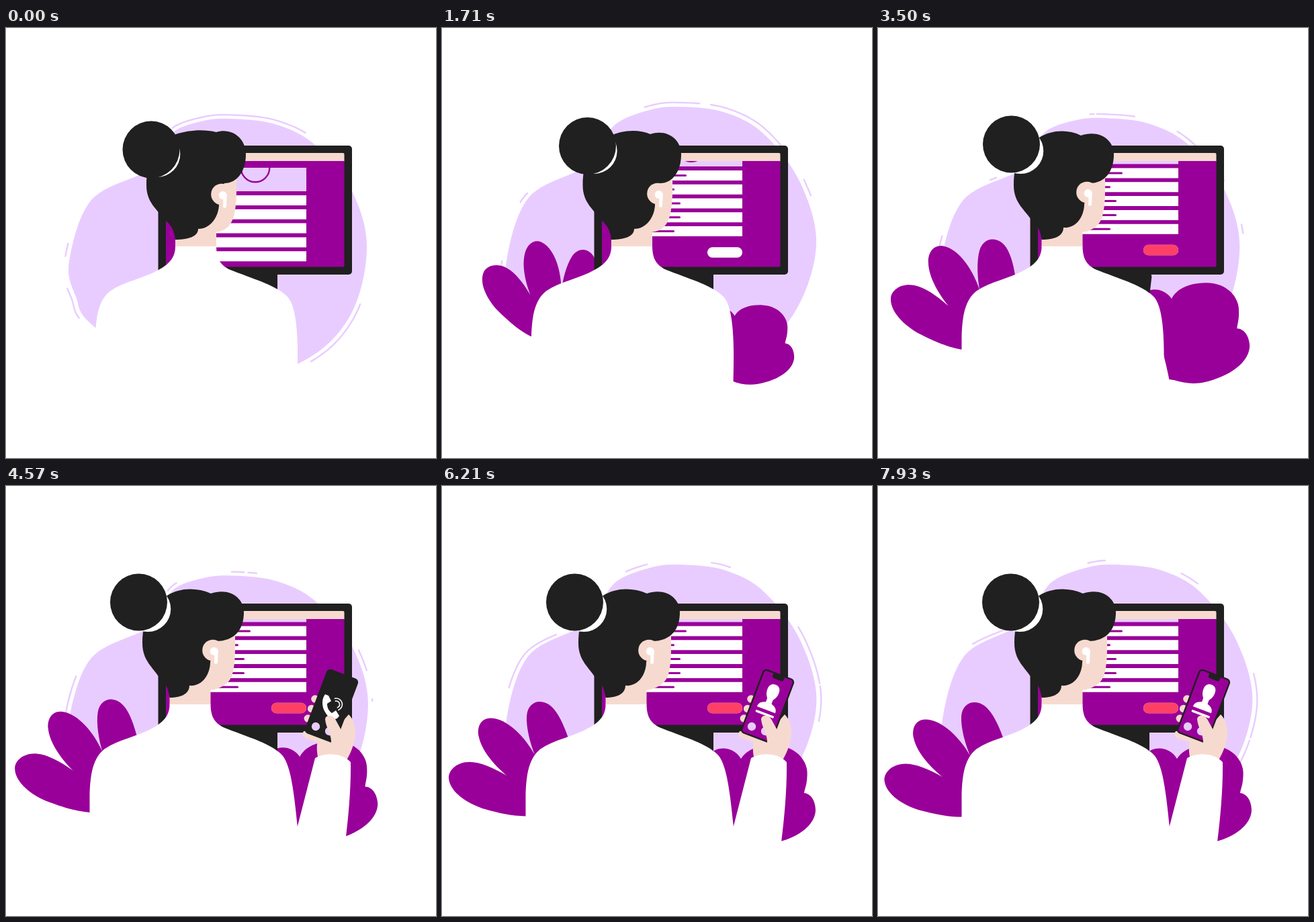
Recreate the animation shown at these times as an HTML page with a canvas. Size 640 by 640 pixels, loop 8000 ms.

```html
<!DOCTYPE html>
<html lang="en">
<head>
<meta charset="utf-8">
<title>Call from the desk</title>
<style>
html, body { margin: 0; width: 100%; height: 100%; overflow: hidden; background: #fff; }
canvas { display: block; }
</style>
</head>
<body>
<canvas id="stage" width="640" height="640"></canvas>
<script>
const ctx = document.getElementById('stage').getContext('2d');
const LOOP = 8000;
const WHITE = '#fff', LILAC = '#e9ccff', PURPLE = '#990099', BLACK = '#202020', SKIN = '#f7dacf', RED = '#ff4066';

// Key points of the blob, clockwise from its left side.
const blob = [[94, 347], [127, 256], [209, 213], [229, 185], [250, 154], [290, 139], [332, 135], [400, 143],
  [460, 174], [515, 243], [537, 330], [510, 432], [434, 500], [280, 545], [133, 446], [104, 400]];

// Dashes around the blob: middle (in key points along the outline) and length.
const fadingDashes = [[.2, .2], [-1.2, 1], [4.9, 1.8], [6.74, 1.9], [8.3, .3], [11.3, 1.1]];
const growingDashes = [[1.36, 1.06], [5, .6], [7.24, .4], [9.56, .9], [10.3, .5]];

const clamp = x => Math.max(0, Math.min(1, x));
const mix = (a, b, k) => a + (b - a) * k;
const span = (t, from, to) => clamp((t - from) / (to - from));
const ease = x => x < .5 ? 4 * x ** 3 : 1 - 4 * (1 - x) ** 3;
const smooth = x => x * x * (3 - 2 * x);

function fill(d, color) {
  ctx.fillStyle = color;
  ctx.fill(new Path2D(d));
}
function rect(x, y, w, h, color, r = 0) {
  ctx.fillStyle = color;
  ctx.beginPath();
  ctx.roundRect(x, y, w, h, r);
  ctx.fill();
}
function disc(x, y, r, color) {
  ctx.fillStyle = color;
  ctx.beginPath();
  ctx.arc(x, y, r, 0, 7);
  ctx.fill();
}
function stroke(color, width) {
  ctx.strokeStyle = color;
  ctx.lineWidth = width;
  ctx.lineCap = 'round';
  ctx.stroke();
}
function line(x1, y1, x2, y2, color, width) {
  ctx.beginPath();
  ctx.moveTo(x1, y1);
  ctx.lineTo(x2, y2);
  stroke(color, width);
}
function group(draw) {
  ctx.save();
  draw();
  ctx.restore();
}
function clip(x, y, w, h) {
  ctx.beginPath();
  ctx.rect(x, y, w, h);
  ctx.clip();
}
function turn(x, y, degrees, scale = 1) {
  ctx.translate(x, y);
  ctx.rotate(degrees * Math.PI / 180);
  ctx.scale(scale, scale);
  ctx.translate(-x, -y);
}

// Pushes the blob's upper right side outwards.
function swell([x, y], phase) {
  const right = span(x, 210, 300);
  return [
    x + phase * (2 + 18 * right * span(y, 500, 330)),
    y - phase * (8 + 10 * right) * span(y, 350, 150)
  ];
}

// Traces a smooth closed curve through the points, from a to b.
function trace(points, a, b, scale) {
  const n = points.length, steps = Math.ceil((b - a) * 12) + 1;
  ctx.beginPath();
  for (let s = 0; s <= steps; s++) {
    const u = mix(a, b, s / steps) + n, i = Math.floor(u), k = u - i;
    const near = [-1, 0, 1, 2].map(d => points[(i + d) % n]);
    ctx.lineTo(...[0, 1].map(axis => {
      const [p, q, r, z] = near.map(point => point[axis]);
      const v = q + k / 2 * (r - p + k * (2 * p - 5 * q + 4 * r - z + k * (3 * (q - r) + z - p)));
      return 325 + (v - 325) * scale;
    }));
  }
}

function drawBlob(t, phase) {
  const points = blob.map(point => swell(point, phase));
  trace(points, 0, blob.length, 1);
  ctx.fillStyle = LILAC;
  ctx.fill();

  const dash = (middle, length) => {
    if (length < .02) return;
    trace(points, middle - length / 2, middle + length / 2, 1.03);
    stroke(LILAC, 2.4);
  };
  const x = span(t, 0, 4800);
  for (const [middle, length] of fadingDashes) dash(middle + 1.6 * (1 - (1 - x) ** 1.5), length * (1 - x * x));
  for (const [middle, length] of growingDashes) dash(middle + (t - 7000) * .00044, length * span(t, 2600, 5400));
}

function drawPlants(t, phase) {
  group(() => {
    turn(192, 465, 57 * (1 - t / LOOP) ** 2.7, 1 - (1 - span(t, 0, 3600)) ** 3.5);
    fill(`M192 465L130 492.5C108 493 90 490 60 482C30 472 11 455 9.5 438C9 427 20 414 40 413.5
      C55 413 75 421 96 433C80 420 58 398 53 375C50 362 55 348 70 347.5C95 347 122 375 137 401
      C130 385 123 360 124 343C125 328 135 321 145 322C165 323 178 350 190 385Z`, PURPLE);
  });
  group(() => {
    turn(398, 518, -4.3 * (1 - phase), 1 - (1 - span(t, 0, 3100)) ** 2);
    fill(`M398 400C410 385 435 388 445 406C455 390 475 385 497 386C530 388 546 412 543.5 432
      C543 445 540 450 539 457C550 458 556 470 556 483C555 505 530 522 504 529
      C480 537 460 535 440 527L398 518Z`, PURPLE);
  });
}

function drawMonitor(t) {
  rect(226.5, 175, 288.5, 192, BLACK, 5);
  rect(320, 360, 84, 60, BLACK);
  rect(238, 186, 265.5, 12.5, SKIN, [2, 2, 0, 0]);
  rect(238, 198, 265.5, 157.5, PURPLE, [0, 0, 2, 2]);
  const scroll = 40.5 * ease(span(t, 500, 2170));
  group(() => {
    clip(238, 198, 265, 157.5);
    rect(295, 208 - scroll, 152, 35, LILAC);
    group(() => {
      clip(295, 208 - scroll, 152, 35);
      ctx.beginPath();
      ctx.arc(371, 208 - scroll * .82, 21.3, 0, 7);
      stroke(PURPLE, 2.4);
    });
    [364, 346, 355, 355, 346].forEach((end, i) => {
      const y = 249 + 20.8 * i - scroll;
      rect(295, y, 152, 15, WHITE);
      const typed = span(t, 150 + 260 * i, 450 + 260 * i);
      if (typed) line(300, y + 7.5, mix(300, end - 1.5, typed), y + 7.5, PURPLE, 3);
    });
    rect(395, 363.3 - scroll, 52, 15.5, WHITE, 7.5);
    ctx.globalAlpha = span(t, 2600, 2800);
    rect(395, 363.3 - scroll, 52, 15.5, RED, 7.5);
  });
}

function drawPhone(t) {
  const contact = span(t, 4900, 5050);
  group(() => {
    ctx.translate(484.5, 327.5);
    ctx.rotate(.361);
    rect(-25, -51, 50, 102, BLACK, 6);
    ctx.globalAlpha = contact;
    rect(-22.6, -48.6, 45.2, 97.2, PURPLE, 4);
    rect(-9, -50, 18, 8, BLACK, 3.5);
    fill(`M0 -34C7 -34 9.5 -29 9 -22C8.5 -16 6 -13 4.5 -11V-5C10 -3 14.5 -1 14.5 6H-14.5
      C-14.5 -1 -10 -3 -4.5 -5V-11C-6 -13 -8.5 -16 -9 -22C-9.5 -29 -7 -34 0 -34Z`, WHITE);
    line(-12.5, 12.6, 13, 12.6, WHITE, 3.4);
    ctx.globalAlpha = 1;
    disc(-11.2, 36.8, 6.2, LILAC);
    disc(10, 36.3, 6.2, LILAC);
  });
  group(() => {
    ctx.globalAlpha = 1 - contact;
    fill('M475 310L480 312L484 320L478 324C478 331 481 335 485 338L491 334L496 342C493 348 486 349 481 344C472 336 467 321 475 310Z', WHITE);
    for (const r of [5, 9]) {
      ctx.beginPath();
      ctx.arc(491.5, 325, r, -1.8, 1.2);
      stroke(WHITE, 1.6);
    }
  });
}

function drawArm(t, raised) {
  if (t < 3200) return;
  group(() => {
    ctx.translate(-73 * (1 - raised), 82 * (1 - raised));
    turn(480, 470, -14 * (1 - raised));
    for (let i = 0; i < 3; i++) disc(460 - 5.3 * i, 317 + 14.5 * i, 5.8, SKIN);
    fill('M443 365C437 375 447 376 465 381L470 362Z', SKIN);
    fill('M465 372C462 385 462 395 465 408L507 408C515 394 520 380 520 365C519 352 515 345 510 340L484 370Z', SKIN);
    drawPhone(t);
    const away = smooth(span(t, 4950, 5250)) - smooth(span(t, 5700, 6100));
    group(() => {
      ctx.translate(4 * away, 6 * away);
      turn(498, 385, -12 * away);
      fill('M475 347C476 340 486 340 490 347C494 354 497 360 500 365L512 362L505 387L484 383C485 370 476 360 475 347Z', SKIN);
    });
    fill('M460 405C475 396 501 397 513 411C513.5 450 510 490 505 530L495 680H395L434 506Z', WHITE);
  });
}

function drawWoman(t, raised) {
  const nod = smooth(span(t, 0, 1710)), lean = smooth(span(t, 1710, 3500)), look = smooth(span(t, 3500, 4500));
  const body = -8.5 * lean;
  const back = .5 * nod - 7.5 * lean + look;
  const top = -3 * nod - 10 * lean;
  const notchX = 313 - 3 * nod - 8 * lean + 3 * look;
  const notchY = 3 * nod + 2 * lean;
  const fringe = 357 - nod - 5 * lean + 3 * look;
  const cheek = 343 - 5 * lean + 3 * look;
  const ear = -10 * lean - 3 * look;
  const earY = 247.5 - nod - 2 * lean;
  const bunX = 216 + .5 * nod - 18 * lean - look;
  const bunY = 181 - 5.5 * nod - 2.5 * lean;
  const tie = 11.5 + nod + 4.5 * lean;

  group(() => {
    ctx.translate(body, 0);
    fill(`M252 324H313C313 345 320 355 338 361.5C375 376 401 383 418 399
      C432 412 ${436 + raised} 454 ${433.5 + 9 * raised} ${528 - 20 * raised}
      V640H133V460C134 428 138 405 155 391.5C176 377 205 373 227 360C242 352 252.5 342 252 324Z`, WHITE);
    fill('M252 285H313V325H252Z', SKIN);
  });
  fill(`M${290 + body} 215H${cheek}C${cheek} 240 ${cheek + 1} 262 ${cheek - 4} 280
    C${cheek - 8} 295 ${325 + body} 303 ${313 + body} 303.5H${285 + body}Z`, SKIN);
  fill(`M${253 + top} ${158 + notchY}C${270 + top} 152 ${295 + top} 150 ${notchX} ${155 + notchY}
    C${fringe - 22} ${148 + notchY * .6} ${fringe} ${163 + notchY * .6} ${fringe} 188
    C${fringe} 212 ${fringe - 12} 231 ${325 + ear} 231L${317 + ear} 262
    C${317 + ear} 280 ${305 + ear} 299 ${286 + ear} ${299 - 2 * lean}
    C${286 + ear} 310 ${272 + ear} 315 ${252 + body} 315
    C${250 + body} 300 ${246 + body} 294 ${238 + body} 287C${225 + back} 270 ${209 + back} 260 ${209 + back} 234
    C${209 + back} 195 ${225 + back} 170 ${253 + top} ${158 + notchY}Z`, BLACK);
  disc(321 + ear, earY, 15.8, SKIN);
  disc(322.7 + ear, earY + 1.5, 6, WHITE);
  line(326.2 + ear, earY + 1.5, 325.5 + ear, earY + 17.8, WHITE, 5);
  disc(bunX + tie * .81, bunY + tie * .59, 34, WHITE);
  disc(bunX, bunY, 42.5, BLACK);
}

function draw(now) {
  const t = now % LOOP;
  const phase = ease(span(t, 0, 2000)) - ease(span(t, 2000, 4000)) + ease(span(t, 4000, 6000));
  const raised = ease(span(t, 3400, 4450));
  ctx.fillStyle = WHITE;
  ctx.fillRect(0, 0, 640, 640);
  drawBlob(t, phase);
  drawPlants(t, phase);
  drawMonitor(t);
  drawArm(t, raised);
  drawWoman(t, raised);
}

let start;
function tick(now) {
  start ??= now;
  draw(now - start);
  requestAnimationFrame(tick);
}
draw(0);
requestAnimationFrame(tick);
</script>
</body>
</html>
```
